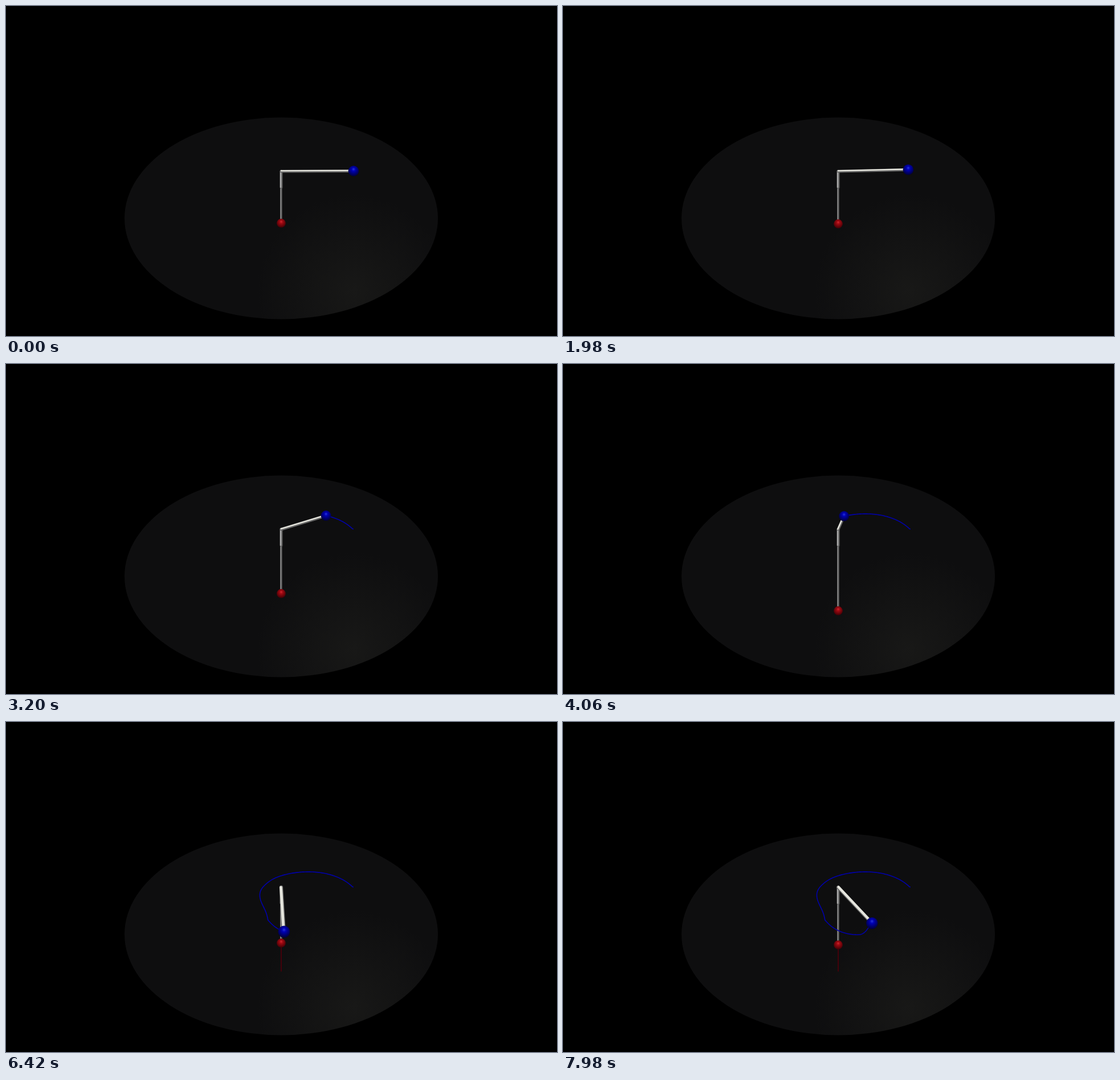
An HTML page with a canvas that plays this animation: 967 px wide and 579 px high, repeating every 8000 ms.

```html
<!DOCTYPE html>
<html lang="en">
<head>
<meta charset="utf-8">
<title>Orbiting weight</title>
<style>
  html, body { margin: 0; width: 100%; height: 100%; overflow: hidden; background: #000; }
  canvas { display: block; }
</style>
</head>
<body>
<canvas id="stage" width="967" height="579"></canvas>
<script>
const LOOP = 8;
const STEP = 0.02;
const HUB = { x: 483, y: 290 };
const ctx = document.getElementById('stage').getContext('2d');

function ease(from, to, t) {
  const u = Math.min(1, Math.max(0, (t - from) / (to - from)));
  return u * u * (3 - 2 * u);
}

// Orbit in the horizontal plane; time in seconds, angle in degrees
const angleAt = t => 88 * (1 + Math.tanh((t - 4.62) / 0.5))
  + 86 * ease(1.6, 5.4, t) + 13.5 * Math.max(0, t - 5.7);

const radiusAt = t => 127 - 97 / Math.cosh((t - 4.58) / 0.59)
  + 5 * ease(5.5, 7.1, t) - 19 * ease(7.1, 8.1, t);

const dropAt = t => 56 * Math.exp(-(((t - 4.4) / 1.23) ** 2)) + 10 * ease(5.5, 8, t);

// Perspective view of the orbit plane
function ballAt(t) {
  const angle = angleAt(t) * Math.PI / 180, radius = radiusAt(t);
  const depth = -radius * Math.sin(angle);
  const scale = 1 / (1 - 0.0025 * depth);
  return {
    x: HUB.x + radius * Math.cos(angle) * scale,
    y: HUB.y - 0.5 + 0.45 * depth * scale
  };
}

const weightAt = t => ({ x: HUB.x, y: 381 + dropAt(t) });

function drawFloor() {
  const light = ctx.createRadialGradient(610, 500, 0, 610, 500, 170);
  light.addColorStop(0, 'rgb(24,24,23)');
  light.addColorStop(1, 'rgb(14,14,15)');
  ctx.fillStyle = light;
  ctx.beginPath();
  ctx.ellipse(483, 372.5, 275, 177, 0, 0, 2 * Math.PI);
  ctx.fill();
}

function line(points, color, width, cap = 'butt') {
  ctx.beginPath();
  points.forEach(p => ctx.lineTo(p.x, p.y));
  ctx.strokeStyle = color;
  ctx.lineWidth = width;
  ctx.lineCap = cap;
  ctx.lineJoin = 'round';
  ctx.stroke();
}

// A cylinder with its bright side facing up and left
function rod(a, b, width, shine, dark, light) {
  const length = Math.hypot(b.x - a.x, b.y - a.y);
  let nx = -(b.y - a.y) / length, ny = (b.x - a.x) / length;
  if (nx + 2 * ny > 0) { nx = -nx; ny = -ny; }
  const offset = (width - shine) / 3;
  const shift = p => ({ x: p.x + nx * offset, y: p.y + ny * offset });
  line([a, b], dark, width, 'round');
  line([shift(a), shift(b)], light, shine, 'round');
}

function ball(p, r, light, main, dark) {
  const fill = ctx.createRadialGradient(p.x, p.y - r * 0.35, 0, p.x, p.y - r * 0.2, r * 1.15);
  fill.addColorStop(0, light);
  fill.addColorStop(0.3, main);
  fill.addColorStop(1, dark);
  ctx.fillStyle = fill;
  ctx.beginPath();
  ctx.arc(p.x, p.y, r, 0, 2 * Math.PI);
  ctx.fill();
}

function draw(t) {
  const blue = ballAt(t), red = weightAt(t);
  const near = blue.y - HUB.y;

  ctx.fillStyle = '#000';
  ctx.fillRect(0, 0, 967, 579);
  drawFloor();

  const blueTrail = [], redTrail = [];
  for (let s = 0; s < t; s += STEP) {
    blueTrail.push(ballAt(s));
    redTrail.push(weightAt(s));
  }
  blueTrail.push(blue);
  redTrail.push(red);

  line(redTrail, '#4a000a', 1.8);
  rod(HUB, red, 4, 2, '#444', '#888');
  rod(HUB, { x: HUB.x, y: 318 }, 5, 2.4, '#5c5c5c', '#aaa');
  ball(red, 7.8, '#d02830', '#a00a12', '#480006');

  line(blueTrail, '#0000aa', 1.6);
  rod(HUB, blue, 5 + Math.max(0, near) * 0.018, 2.4 + Math.max(0, near) * 0.03, '#686868', '#e6e6de');
  ball(blue, 9.3 + near * 0.015, '#2838d8', '#0000b4', '#000040');
}

function frame(now) {
  draw(now / 1000 % LOOP);
  requestAnimationFrame(frame);
}
requestAnimationFrame(frame);
</script>
</body>
</html>
```
